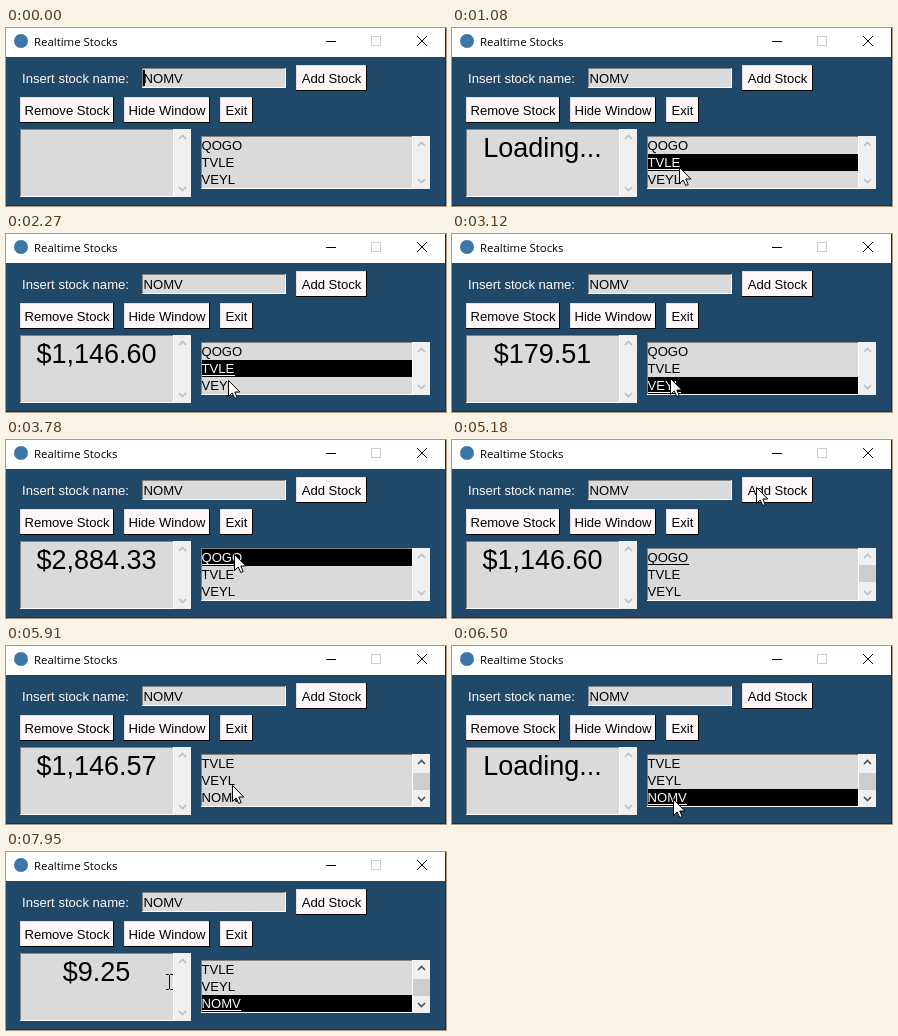
Recreate the animation shown at these times as an HTML page. Size 440x178 px, loop 8 s.

```html
<!DOCTYPE html>
<html lang="en">
<head>
<meta charset="utf-8">
<title>Realtime Stocks</title>
<style>
  html, body { margin: 0; width: 100%; height: 100%; overflow: hidden; background: #204969; }
  svg { display: block; width: 440px; height: 178px; }
  text { font: 13.1px "Liberation Sans", Arial, sans-serif; white-space: pre; }
  .title { font: 11.4px "Open Sans", "Noto Sans", sans-serif; }
  #price { font-size: 27px; text-anchor: middle; }
  .label { fill: #fff7f7; }
  rect, .line { shape-rendering: crispEdges; }
  .face { fill: #fff7f7; }
  .pressed .face { fill: #000; }
  .pressed text { fill: #fff7f7; }
  .arrow { fill: none; stroke: #bfbfbf; stroke-width: 1.6; }
  .enabled .arrow { stroke: #505050; }
</style>
</head>
<body>
<svg id="stage" viewBox="0 0 440 178">
  <rect width="440" height="178" fill="#204969"/>
  <rect width="440" height="29" fill="#fff"/>
  <path class="line" d="M439.5 0V177.5H0" fill="none" stroke="#262c32"/>
  <circle cx="15" cy="13" r="7" fill="#3d77a8"/>
  <text class="title" x="28" y="17.5">Realtime Stocks</text>
  <path class="line" d="M320 13.5h10" stroke="#000"/>
  <rect x="365.5" y="8.5" width="9" height="9" fill="none" stroke="#ccc"/>
  <path d="M411 8l10 10m0-10l-10 10" stroke="#000"/>
  <text class="label" x="16" y="55">Insert stock name:</text>
</svg>
<script>
const LOOP = 8000;
const STOCKS = ["QOGO", "TVLE", "VEYL", "NOMV"];
const stage = document.getElementById("stage");

function add(tag, attrs, parent = stage, content = "") {
  const node = document.createElementNS("http://www.w3.org/2000/svg", tag);
  for (const key in attrs) node.setAttribute(key, attrs[key]);
  node.textContent = content;
  parent.append(node);
  return node;
}

const box = (x, y, width, height, fill, parent) =>
  add("rect", { x, y, width, height, fill }, parent);

function bevel(x, y, w, h, topLeft, bottomRight, parent) {
  const edge = (d, stroke) => add("path", { d, stroke, fill: "none", class: "line" }, parent);
  edge(`M${x + .5} ${y + h}V${y + .5}H${x + w}`, topLeft);
  edge(`M${x} ${y + h - .5}H${x + w - .5}V${y}`, bottomRight);
}

function button(x, y, width, label) {
  const g = add("g", {});
  add("rect", { x, y, width, height: 26, class: "face" }, g);
  bevel(x, y, width, 26, "#e6dede", "#000", g);
  add("text", { x: x + width / 2, y: y + 18, "text-anchor": "middle" }, g, label);
  return g;
}

function field(x, y, w, h) {
  box(x, y, w, h, "#dadada");
  bevel(x, y, w, h, "#838383", "#fff");
}

function scrollbar(x, y, h) {
  const g = add("g", {});
  box(x, y, 17, h, "#f0f0f0", g);
  add("path", { class: "arrow", d: `M${x + 5} ${y + 10}l3.5-3.5 3.5 3.5` }, g);
  add("path", { class: "arrow", d: `M${x + 5} ${y + h - 10}l3.5 3.5 3.5-3.5` }, g);
  return g;
}

field(136, 40, 144, 20);
add("text", { x: 137.5, y: 55 }, stage, STOCKS[3]);
const caret = box(137, 42, 2, 16, "#000");

const addButton = button(290, 37, 71, "Add Stock");
button(14, 69, 94, "Remove Stock");
button(118, 69, 86, "Hide Window");
button(214, 69, 33, "Exit");

field(14, 101, 154, 68);
scrollbar(168, 101, 68);
const price = add("text", { id: "price", x: 90.5, y: 129 });

field(195, 108, 212, 53);
const listBar = scrollbar(407, 108, 53);
const thumb = box(407, 125, 17, 17, "#cdcdcd");
const rows = [0, 1, 2].map(i => {
  const y = 109 + i * 17;
  return {
    back: box(196, y, 210, 17, "#000"),
    text: add("text", { x: 195.5, y: y + 13 }),
    line: box(196, y + 15, 0, 1, "#000")
  };
});

const pointer = add("path", {
  d: "M.5 .5V16.5L4.2 13L6.8 18.5L9.2 17.5L6.8 12H11.8Z",
  fill: "#fff", stroke: "#000", "stroke-width": 1
});
const beam = add("path", {
  d: "M160 122.5h2.5l1 1 1-1h2.5M163.5 123v14M160 137.5h2.5l1-1 1 1h2.5",
  fill: "none", stroke: "#111"
});

// [time, text]
const PRICES = [
  [0, ""], [740, "Loading..."], [2130, "$1,146.60"], [2530, "Loading..."],
  [3120, "$179.51"], [3640, "$2,884.33"], [4110, "$1,146.60"],
  [5450, "$1,146.57"], [6430, "Loading..."], [6890, "$9.25"]
];

// [time, active stock, selected, first visible stock]
const LIST = [
  [0, -1, false, 0], [680, 1, true, 0], [2460, 2, true, 0], [3640, 0, true, 0],
  [4110, 1, true, 0], [5180, 0, false, 0], [5910, 0, false, 1], [6430, 3, true, 1]
];

// [first step, last step, steps, x, y]
const MOVES = [
  [130, 880, 12, 227, 138], [940, 1670, 10, 223, 146], [2130, 2860, 10, 218, 145],
  [3120, 3920, 12, 229, 112], [3980, 4180, 4, 227, 134], [4320, 4450, 3, 242, 105],
  [4516, 4910, 7, 312, 36], [4980, 5110, 3, 304, 47], [5250, 5710, 8, 226, 138],
  [5910, 6500, 8, 221, 153], [7090, 7090, 1, 221, 152], [7890, 7890, 1, 197, 138]
];

const current = (events, t) => events.filter(e => e[0] <= t).pop();
const ease = p => p * p * (3 - 2 * p);

function pointerAt(t) {
  let x = 238, y = 178;
  for (const [start, end, steps, toX, toY] of MOVES) {
    if (t < start) break;
    const gap = (end - start) / (steps - 1) || 1;
    const done = Math.min(steps, Math.floor((t - start) / gap + .01) + 1);
    const p = ease(done / steps);
    x += (toX - x) * p;
    y += (toY - y) * p;
  }
  return [Math.round(x), Math.round(y)];
}

const show = (node, on) => node.setAttribute("visibility", on ? "visible" : "hidden");

function draw(t) {
  const [, active, selected, first] = current(LIST, t);
  rows.forEach((row, i) => {
    const index = i + first;
    const isActive = index === active;
    const color = isActive && selected ? "#fff7f7" : "#000";
    row.text.textContent = STOCKS[index];
    row.text.setAttribute("fill", color);
    row.line.setAttribute("fill", color);
    row.line.setAttribute("width", isActive ? Math.round(row.text.getComputedTextLength()) : 0);
    show(row.back, isActive && selected);
  });
  price.textContent = current(PRICES, t)[1];
  show(caret, t < 680);
  addButton.classList.toggle("pressed", t >= 5110 && t < 5180);
  show(thumb, t >= 5180);
  thumb.setAttribute("y", 125 + 2 * first);
  listBar.classList.toggle("enabled", t >= 5250);
  show(pointer, t >= 130 && t < 7950);
  show(beam, t >= 7950);
  pointer.setAttribute("transform", `translate(${pointerAt(t)})`);
}

const began = performance.now();
function tick() {
  draw((performance.now() - began) % LOOP);
  requestAnimationFrame(tick);
}
tick();
</script>
</body>
</html>
```
